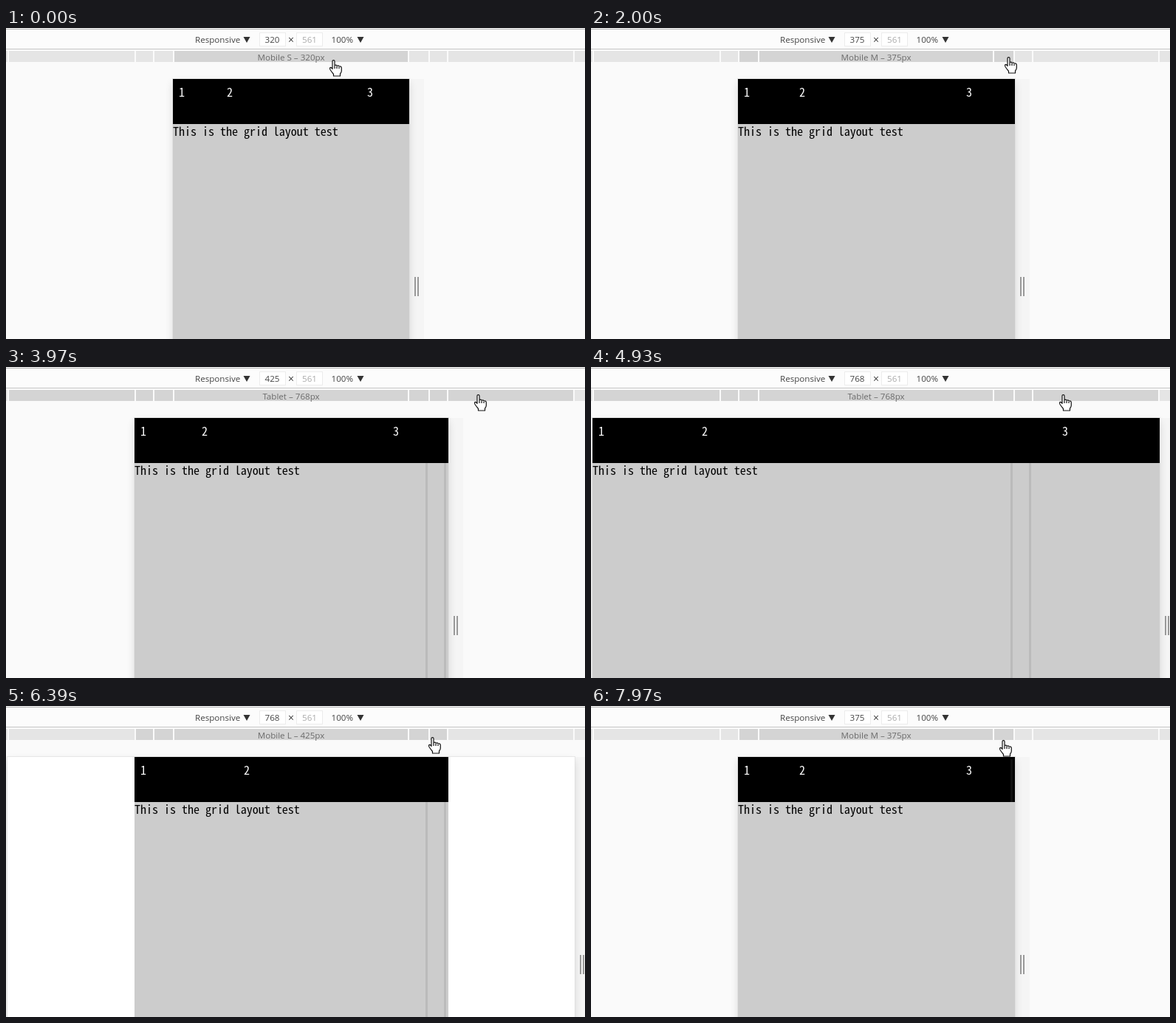
Write an HTML page that moves like this. It is 784x421 px and loops after 8350 ms.

```html
<!DOCTYPE html>
<html lang="en">
<head>
<meta charset="utf-8">
<title>Responsive grid test</title>
<style>
  html, body { margin: 0; width: 100%; height: 100%; overflow: hidden; background: #fafafa; }
  svg { display: block; width: 784px; height: 421px; }
  text { white-space: pre; }
  .ui { font: 11.6px "Open Sans", "Noto Sans", sans-serif; fill: #444; }
  .mid { text-anchor: middle; }
  .page { font-family: "Noto Sans Mono CJK SC", "Liberation Mono", monospace; font-weight: 300; }
</style>
</head>
<body>
<svg viewBox="0 0 784 421">
  <defs>
    <clipPath id="clip"><rect id="clipBox" y="69" height="352"/></clipPath>
    <filter id="soft" x="-10%" y="-10%" width="120%" height="120%"><feGaussianBlur stdDeviation="6"/></filter>
  </defs>
  <rect width="784" height="421" fill="#fafafa"/>

  <g id="device">
    <rect id="gutter" y="69" width="20" height="352" fill="#f5f5f5"/>
    <rect id="shadow" y="74" height="380" fill="#000" opacity=".13" filter="url(#soft)"/>
    <rect id="frame" y="68.5" height="380" fill="#fff" stroke="#000" stroke-opacity=".08"/>
    <path id="grip" d="M1 337v26M5 337v26" stroke="#999" stroke-width="2"/>
  </g>

  <g clip-path="url(#clip)">
    <g id="content" class="page">
      <rect id="body" y="130" height="291" fill="#ccc"/>
      <rect id="head" y="69" height="61" fill="#000"/>
      <g fill="#fff">
        <text x="8" y="93">1</text>
        <text id="two" y="93">2</text>
        <text id="three" y="93">3</text>
      </g>
      <text y="146">This is the grid layout test</text>
    </g>
    <g id="trails" fill="#bbb"></g>
    <rect id="thumb" y="72" width="3" height="58" fill="#fff" fill-opacity=".07"/>
  </g>

  <rect width="784" height="29" fill="#fcfcfc"/>
  <path d="M0 1.5H784" stroke="#b0b0b0"/>
  <path d="M0 28.5H784" stroke="#c4c4c4"/>
  <g fill="#fff" stroke="#ececec">
    <rect x="343.5" y="6.5" width="35" height="18"/>
    <rect x="393.5" y="6.5" width="35" height="18"/>
  </g>
  <g class="ui">
    <text x="256" y="20">Responsive</text>
    <text id="field" class="mid" x="360.5" y="20"></text>
    <text class="mid" x="386" y="21" font-size="14">×</text>
    <text class="mid" x="411" y="20" style="fill:#aaa">561</text>
    <text x="440.5" y="20">100%</text>
  </g>
  <path d="M321.5 12h9l-4.5 8zM475.5 12h9l-4.5 8z" fill="#333"/>

  <g id="ruler"></g>
  <text id="label" class="ui mid" x="386" y="44" style="fill:#6a6a6a"></text>

  <g id="cursor" stroke="#111" stroke-width="1.2" stroke-linejoin="round">
    <path fill="#fff" d="M4 2Q4 .6 5.500 .6Q7 .6 7 2V7.500Q9 6.500 10 8.200Q12 7.200 13 9Q16.300 8.300 16.300 11.500V15Q16.300 17 14.500 19V22H5.500V19.500Q3 16.500 1 13.500Q0 11.500 1 10.500Q2.500 10 4 12.500Z"/>
    <path fill="none" d="M7 8v4M10 9v3M13 10v2"/>
  </g>
</svg>
<script>
const LOOP = 8350, CENTER = 386, STEP = 75, SCROLLBAR = 6;
const $ = id => document.getElementById(id);
const set = (id, attrs) => {
  for (const key in attrs) $(id).setAttribute(key, attrs[key]);
};
const leftOf = width => Math.ceil(CENTER - width / 2);
const rightOf = width => leftOf(width) + width;

const presets = { 'Mobile S': 320, 'Mobile M': 375, 'Mobile L': 425, 'Tablet': 768 };
const widths = Object.values(presets);

// Each click picks a width; the slow ones repaint in two stages.
const clicks = [
  { at: 0, width: 320 },
  { at: 1850, width: 375, lag: 150 },
  { at: 3030, width: 425 },
  { at: 4190, width: 768 },
  { at: 6390, width: 425, lag: 130 },
  { at: 6940, width: 375, lag: 130 },
];

const start = { x: 438, y: 43 };
const glides = [
  { from: 780, to: 1470, x: 560, y: 39 },
  { from: 2340, to: 2580, x: 585, y: 43 },
  { from: 3420, to: 3970, x: 634, y: 37 },
  { from: 5850, to: 6230, x: 572, y: 42 },
  { from: 6700, to: 6800, x: 553, y: 46 },
];

function sizesAt(t) {
  const index = clicks.findLastIndex(click => click.at <= t);
  const { at, width, lag = 0 } = clicks[index];
  const before = index ? clicks[index - 1].width : width;
  const settling = t < at + lag, shrinking = width < before;
  return {
    frame: settling && shrinking ? before : width,
    view: width,
    layout: settling ? before : width,
    thumb: shrinking && t - at > 800,
  };
}

function cursorAt(t) {
  let { x, y } = start;
  for (const glide of glides) {
    if (t < glide.from) break;
    const held = Math.floor((t - glide.from) / STEP + 1) * STEP;
    const p = t >= glide.to ? 1 : held / (glide.to - glide.from + STEP);
    const eased = p * p * (3 - 2 * p);
    x += (glide.x - x) * eased;
    y += (glide.y - y) * eased;
  }
  return { x: Math.round(x), y: Math.round(y) };
}

// Ruler: nested bars, widest first, each with a light edge on both sides.
$('ruler').innerHTML = '<rect y="31" width="784" height="15" fill="#e5e5e5"/>' +
  [...widths].reverse().map(width =>
    `<rect id="bar${width}" x="${leftOf(width)}" y="31" width="${width}" height="15"/>` +
    `<path d="M${leftOf(width) + 1} 30v17M${rightOf(width) - 1} 30v17" stroke="#fafafa" stroke-width="2"/>`
  ).join('');

// Scrollbars of the two middle widths leave a trail on the page.
const trails = { 375: 2340, 425: 3030 };
$('trails').innerHTML = Object.keys(trails).map(width =>
  `<rect id="trail${width}" x="${rightOf(+width) - SCROLLBAR}" y="130" width="3" height="291"/>`
).join('');

// Page text sits on an 8px character grid.
const pen = document.createElement('canvas').getContext('2d');
pen.font = '300 16px ' + getComputedStyle($('content')).fontFamily;
$('content').style.fontSize = 16 * 8 / pen.measureText('0').width + 'px';

function drawPage(t) {
  const { frame, view, layout, thumb } = sizesAt(t);
  const right = rightOf(frame), shown = Math.min(view, layout);

  set('shadow', { x: leftOf(frame), width: frame });
  set('frame', { x: leftOf(frame) - .5, width: frame + 1 });
  set('gutter', { x: right });
  set('grip', { transform: `translate(${right + 7})` });
  $('field').textContent = frame;

  set('clipBox', { x: leftOf(view), width: shown });
  set('content', { transform: `translate(${leftOf(view)})` });
  set('head', { width: shown });
  set('body', { width: shown });
  set('two', { x: Math.round(layout / 6 + 20) });
  set('three', { x: Math.round(layout * 5 / 6 - 4) });
  set('thumb', { x: right - SCROLLBAR, opacity: +thumb });
  for (const width in trails) {
    set('trail' + width, { opacity: +(t >= trails[width] && t < clicks.at(-1).at) });
  }
}

function drawPointer(t) {
  const { x, y } = cursorAt(t);
  set('cursor', { transform: `translate(${x} ${y})` });
  const reach = Math.abs(x + 6 - CENTER);
  const [name, hovered] = Object.entries(presets).find(([, width]) => reach <= width / 2);
  $('label').textContent = `${name} – ${hovered}px`;
  for (const width of widths) {
    set('bar' + width, { fill: width <= hovered ? '#d4d4d4' : '#e5e5e5' });
  }
}

const begin = performance.now();
function tick() {
  const t = (performance.now() - begin) % LOOP;
  drawPage(t);
  drawPointer(t);
  requestAnimationFrame(tick);
}
tick();
</script>
</body>
</html>
```
